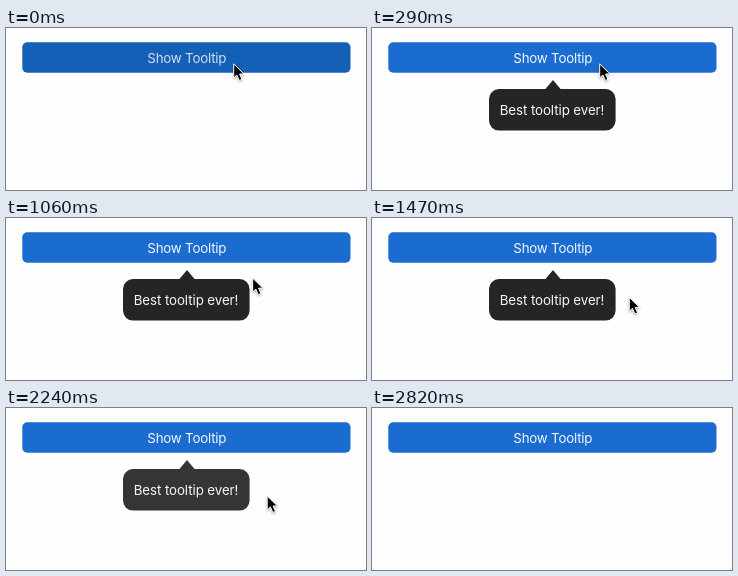
An HTML page for the animation above (3.36 s loop, 360 by 162 pixels).

```html
<!DOCTYPE html>
<html>
<head>
<meta charset="utf-8">
<style>
  html, body { margin: 0; width: 100%; height: 100%; overflow: hidden; background: #fefefe; }
  svg { display: block; width: 360px; height: 162px; }
  text { font: 13.3px Inter, "Liberation Sans", sans-serif; letter-spacing: -.2px; text-anchor: middle; fill: #f4f8fd; }
  #tip { fill: #242625; }
  #tip text { letter-spacing: -.07px; }
  #cursor { filter: drop-shadow(0 1px 1px rgba(0, 0, 0, .35)); }
</style>
</head>
<body>
<svg viewBox="0 0 360 162">
  <rect id="button" x="16.3" y="14.2" width="328.2" height="30.6" rx="5"/>
  <text id="label" x="180.8" y="34.5">Show Tooltip</text>
  <g id="tip">
    <path d="M173 61.5L181 52L189 61.5Z"/>
    <rect x="117" y="61" width="126.6" height="41.6" rx="10"/>
    <text x="180" y="87">Best tooltip ever!</text>
  </g>
  <path id="cursor" d="M.5 .3V14.3L3.7 11.4L6.1 16.9L8.8 15.8L6.4 10.4H10.8Z" stroke="#fff"/>
</svg>
<script>
const LOOP = 3360;
const $ = id => document.getElementById(id);
const button = $('button'), label = $('label'), tip = $('tip'), cursor = $('cursor');

const ramp = (t, a, b) => Math.min(1, Math.max(0, (t - a) / (b - a)));
const easeIn = k => k ** 1.6;
const easeOut = k => 1 - easeIn(1 - k);
const mix = (a, b, k) => `rgb(${a.map((v, i) => Math.round(v + (b[i] - v) * k))})`;

function draw(now) {
  const t = now % LOOP;

  const release = ramp(t, 80, 290);
  button.setAttribute('fill', mix([20, 96, 182], [26, 108, 208], release));
  label.style.fill = mix([208, 223, 240], [244, 248, 253], release);
  tip.setAttribute('opacity', ramp(t, 90, 290) * (1 - ramp(t, 2229, 2393)));

  // Two slowing drifts, then a speeding exit
  const drift = easeOut(ramp(t, 740, 1240));
  const settle = easeOut(ramp(t, 1240, 1760));
  const leave = easeIn(ramp(t, 2390, 2820));
  const x = 227.2 + 23.5 * drift + 10 * settle + 55 * leave;
  const y = 35.6 + 30 * drift + 22 * settle + 87 * leave;
  cursor.setAttribute('transform', `translate(${x} ${y})`);
  cursor.setAttribute('visibility', t < 2820 ? 'visible' : 'hidden');

  requestAnimationFrame(draw);
}
draw(0);
</script>
</body>
</html>
```
